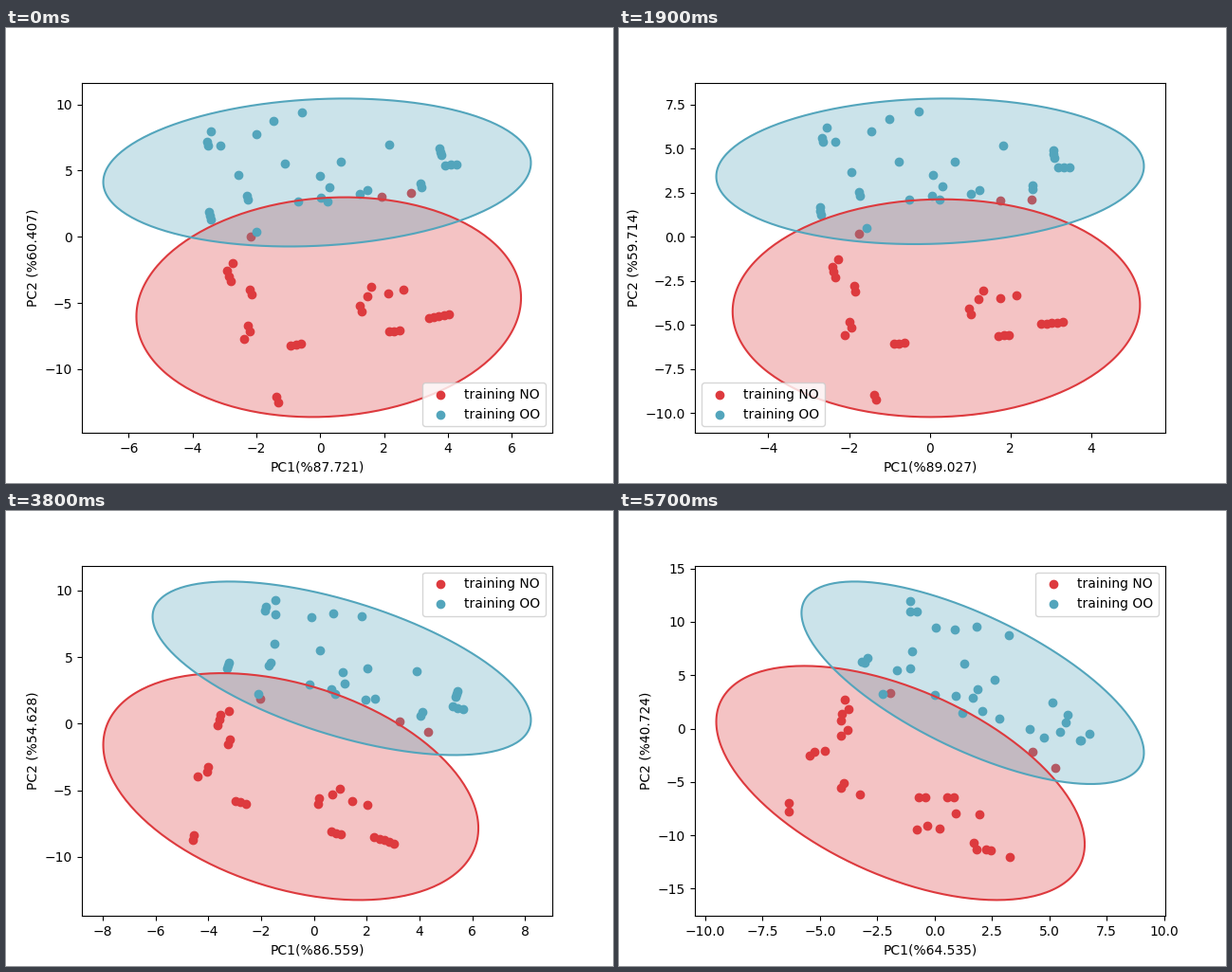
Animation, 640 px wide and 480 px high, one loop 5.8 s. Source, as a matplotlib script:

```python
import matplotlib.pyplot as plt
import numpy as np
from matplotlib.animation import FuncAnimation

FRAMES, STEP = 58, 100
RED, BLUE = "#DD3A3E", "#53A5BC"

# frame, PC1 %, PC2 %, red ellipse (centre, half size, tilt), blue half width and tilt
KEYS = np.array([
    (0, 87.721, 60.407, .267, -5.32, 6.026, 8.306, .085, 6.70, .13),
    (13, 88.548, 59.257, .013, -4.303, 5.329, 6.545, -.05, 5.709, -.1),
    (19, 89.027, 59.714, .162, -4.05, 5.047, 6.17, .03, 5.298, .07),
    (29, 88.295, 57.139, -.22, -4.417, 6.096, 6.857, -.165, 6.366, -.3),
    (38, 86.559, 54.628, -.88, -4.729, 7.105, 8.519, -.367, 7.166, -.595),
    (46, 84.996, 53.351, -1.42, -4.87, 7.571, 10.243, -.46, 7.333, -.688),
    (57, 64.535, 40.724, -1.49, -5.098, 8.035, 10.966, -.523, 7.468, -.69),
])


def cloud(singles, stacks, rows):
    """Unit-disc samples: lone ones, then (u, v, count) groups up or across."""
    points = list(singles)
    for groups, du, dv in ((stacks, 0, .05), (rows, .027, 0)):
        for u, v, n in groups:
            points += [(u + du * k, v + dv * k) for k in np.arange(n) - (n - 1) / 2]
    return np.array(points).T


RED_CLOUD = cloud(
    singles=[(.60, .912), (.448, .922), (-.28, .738), (-.413, .531), (.215, .046),
             (.248, .123), (.324, .038), (.405, .052), (-.477, -.17)],
    stacks=[(-.451, .417, 3), (-.37, .243, 2), (-.437, -.08, 2), (-.411, -.759, 2),
            (.158, -.056, 2)],
    rows=[(-.226, -.291, 3), (.291, -.304, 3), (.54, -.233, 5)])

BLUE_CLOUD = cloud(
    singles=[(.005, .832), (-.137, .747), (-.232, .586), (-.437, .667), (-.41, .465),
             (-.137, .157), (-.364, .046), (.009, -.047), (.041, -.208), (.123, .12),
             (.364, .301), (-.123, -.377), (-.351, -.738), (.169, -.338), (.21, -.286),
             (-.014, -.343), (.014, -.4)],
    stacks=[(-.469, .505, 2), (-.351, -.265, 2), (-.548, -.475, 3), (.46, -.286, 2),
            (.591, .153, 3)],
    rows=[(.623, -.034, 3)])

ANGLE = np.linspace(0, 2 * np.pi, 241)
CIRCLE = np.array([np.cos(ANGLE), np.sin(ANGLE)])

fig, ax = plt.subplots(figsize=(6.4, 4.8), dpi=100)


def key_at(i):
    """Percentages, red ellipse and blue ellipse at frame i."""
    pc1, pc2, cx, cy, hx, hy, tilt, blue_hx, blue_tilt = (
        np.interp(i, KEYS[:, 0], col) for col in KEYS.T[1:])
    # The blue group mirrors the red one and grows taller as it leans
    lean = tilt**2
    blue = (.17 - cx, -cy * (.915 - .27 * lean),
            blue_hx, hy * (.668 + .72 * lean), blue_tilt)
    return (pc1, pc2), (cx, cy, hx, hy, tilt), blue


def limits(a, b, axis):
    """Axis range holding both ellipses with a 5 % margin."""
    lo = min(e[axis] - e[axis + 2] for e in (a, b))
    hi = max(e[axis] + e[axis + 2] for e in (a, b))
    pad = .05 * (hi - lo)
    return lo - pad, hi + pad


def place(ellipse, points):
    """Map unit-disc points into the ellipse."""
    cx, cy, hx, hy, tilt = ellipse
    u, v = points
    return cx + hx * u, cy + hy * (tilt * u + np.sqrt(1 - tilt**2) * v)


def turned(points, angle):
    """Rotate clockwise."""
    c, s = np.cos(angle), np.sin(angle)
    return np.array([[c, s], [-s, c]]) @ points


def scattered(points, i, seed):
    """Loosen the groups towards the end of the loop."""
    noise = np.random.default_rng(seed).normal(size=points.shape)
    return points + np.interp(i, (46, 57), (0, .04)) * noise


def draw_group(ellipse, points, color, label):
    ax.scatter(*place(ellipse, points), color=color, label=label)
    outline = place(ellipse, CIRCLE)
    ax.fill(*outline, color=color, alpha=.3, lw=0)
    ax.plot(*outline, color=color, lw=1.5, solid_capstyle="butt")


def legend_spot(i):
    if i < 4:
        return "lower right"
    return "lower left" if i < 30 else "upper right"


def update(i):
    ax.clear()
    (pc1, pc2), red, blue = key_at(i)
    red_turn = .72 * (np.arcsin(-.165) - np.arcsin(red[4]))
    blue_turn = .187 * (blue[0] - .39)
    draw_group(red, scattered(turned(RED_CLOUD, red_turn), i, 1), RED, "training NO")
    draw_group(blue, scattered(turned(BLUE_CLOUD, blue_turn), i, 2), BLUE, "training OO")
    ax.set_xlim(limits(red, blue, 0))
    ax.set_ylim(limits(red, blue, 1))
    ax.set_xlabel(f"PC1(%{pc1:.3f})")
    ax.set_ylabel(f"PC2 (%{pc2:.3f})")
    ax.legend(loc=legend_spot(i))
    return []


anim = FuncAnimation(fig, update, frames=FRAMES, init_func=lambda: [],
                     interval=STEP, repeat=True, repeat_delay=0)
plt.show()
```
